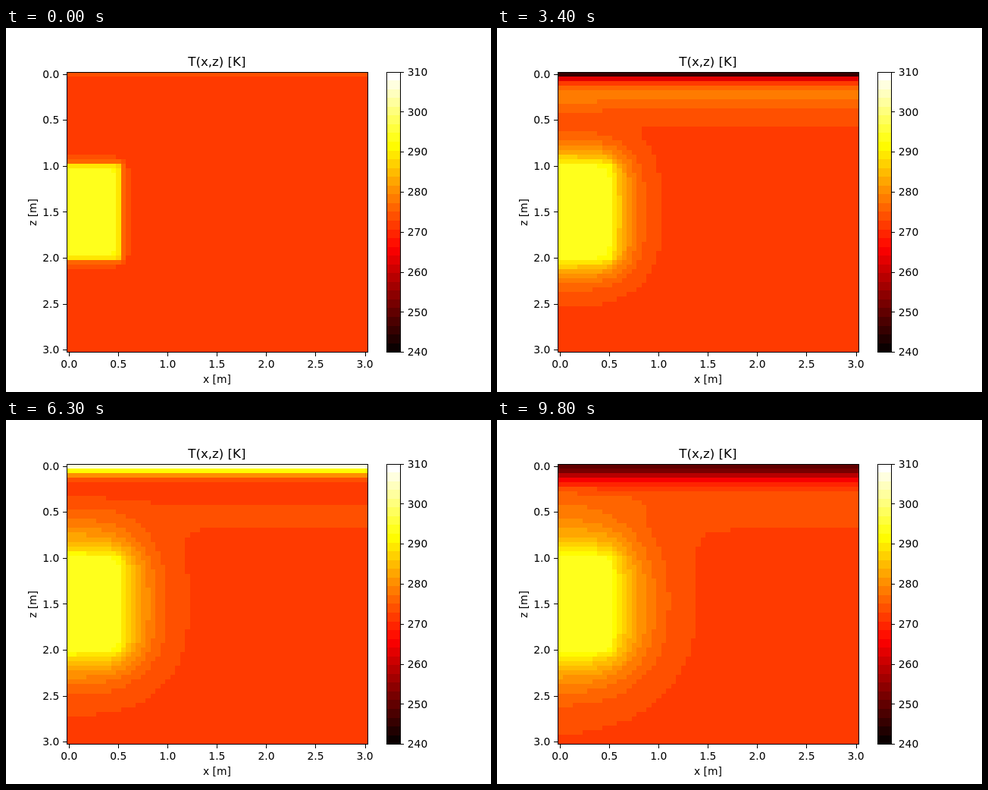
An HTML page with a canvas for the animation above (9.9 s loop, 640 px wide and 480 px high).

```html
<!DOCTYPE html>
<html lang="en">
<head>
<meta charset="utf-8">
<title>T(x,z) [K]</title>
<style>
  html, body { margin: 0; width: 100%; height: 100%; overflow: hidden; background: #fff; }
  canvas, svg { position: absolute; left: 0; top: 0; width: 640px; height: 480px; }
  text { font: 13.89px "DejaVu Sans", sans-serif; fill: #000; }
  .title { font-size: 16.67px; }
  .mid { text-anchor: middle; }
  .end { text-anchor: end; }
  path, rect { fill: none; stroke: #000; stroke-width: 1; }
</style>
</head>
<body>
<canvas id="map" width="640" height="480"></canvas>
<svg id="axes" viewBox="0 0 640 480"></svg>
<script>
const N = 61, FRAMES = 99, FRAME_MS = 100, LEVELS = 32;
const LEFT = 80, TOP = 57.6, WIDTH = 396.8, HEIGHT = 369.6;
const T_MIN = 240, T_MAX = 310;

// Ground, heated room and seasonal surface
const GROUND = 272.15, ROOM = 293.6, MEAN = 273.3, SWING = 40, PERIOD = 51.8;
const DIFFUSION = 0.36;

const clamp = (v, lo, hi) => Math.min(hi, Math.max(lo, v));

function hot(level) {
  const x = level / (LEVELS - 1);
  const channel = v => Math.round(255 * clamp(v, 0, 1));
  const r = channel(0.0416 + 0.9584 * x / 0.365079);
  const g = channel((x - 0.365079) / 0.380953);
  const b = channel((x - 0.746032) / 0.253968);
  return `rgb(${r},${g},${b})`;
}
const palette = Array.from({ length: LEVELS }, (_, i) => hot(i));

const toLevel = t =>
  clamp(Math.floor((t - T_MIN) / (T_MAX - T_MIN) * LEVELS), 0, LEVELS - 1);

// One implicit diffusion step with insulated sides
function diffuse(field) {
  const old = field.slice();
  for (let pass = 0; pass < 18; pass++) {
    for (let z = 0, k = 0; z < N; z++) {
      for (let x = 0; x < N; x++, k++) {
        let sum = 0, count = 0;
        if (x > 0) { sum += field[k - 1]; count++; }
        if (x < N - 1) { sum += field[k + 1]; count++; }
        if (z > 0) { sum += field[k - N]; count++; }
        if (z < N - 1) { sum += field[k + N]; count++; }
        field[k] = (old[k] + DIFFUSION * sum) / (1 + DIFFUSION * count);
      }
    }
  }
}

function simulate() {
  const field = new Float64Array(N * N).fill(GROUND);
  const frames = [];
  for (let n = 0; n < FRAMES; n++) {
    field.fill(MEAN + SWING * Math.sin(2 * Math.PI * n / PERIOD), 0, N);
    for (let z = 20; z <= 40; z++) field.fill(ROOM, z * N, z * N + 11);
    diffuse(field);
    frames.push(Uint8Array.from(field, toLevel));
  }
  return frames;
}

const ctx = document.getElementById("map").getContext("2d");
const colX = k => Math.round(LEFT + WIDTH * k / N);
const rowY = k => Math.round(TOP + HEIGHT * k / N);

function drawField(levels) {
  for (let z = 0; z < N; z++) {
    const y = rowY(z), h = rowY(z + 1) - y;
    for (let x = 0; x < N;) {
      const level = levels[z * N + x], start = x;
      while (x < N && levels[z * N + x] === level) x++;
      ctx.fillStyle = palette[level];
      ctx.fillRect(colX(start), y, colX(x) - colX(start), h);
    }
  }
}

function drawColorbar() {
  const edge = i => Math.round(TOP + HEIGHT * (1 - i / LEVELS));
  palette.forEach((color, i) => {
    ctx.fillStyle = color;
    ctx.fillRect(502, edge(i + 1), 18, edge(i) - edge(i + 1));
  });
}

function drawAxes() {
  const parts = [];
  const text = (x, y, s, cls = "", extra = "") =>
    parts.push(`<text x="${x}" y="${y}" class="${cls}" ${extra}>${s}</text>`);
  const line = d => parts.push(`<path d="${d}"/>`);
  const snap = v => Math.round(v) + 0.5;

  parts.push('<rect x="80.5" y="58.5" width="397" height="369"/>');
  parts.push('<rect x="502.5" y="58.5" width="18" height="369"/>');
  for (let v = 0; v <= 3; v += 0.5) {
    const part = (v + 0.025) / 3.05;
    const x = LEFT + WIDTH * part, y = TOP + HEIGHT * part;
    line(`M${snap(x)} 428v5`);
    line(`M75 ${snap(y)}h5`);
    text(x, 448, v.toFixed(1), "mid");
    text(70.3, Math.round(y + 5.1), v.toFixed(1), "end");
  }
  for (let t = T_MIN; t <= T_MAX; t += 10) {
    const y = TOP + HEIGHT * (T_MAX - t) / (T_MAX - T_MIN);
    line(`M521 ${snap(y)}h4`);
    text(529.8, Math.round(y + 5.1), t);
  }
  text(278.4, 50, "T(x,z) [K]", "title mid");
  text(278.4, 468, "x [m]", "mid");
  text(0, 0, "z [m]", "mid", 'transform="translate(40 243) rotate(-90)"');
  document.getElementById("axes").innerHTML = parts.join("");
}

const frames = simulate();
let shown = -1;

function tick() {
  const n = Math.floor(performance.now() / FRAME_MS) % FRAMES;
  if (n !== shown) drawField(frames[shown = n]);
  requestAnimationFrame(tick);
}

drawAxes();
drawColorbar();
tick();
</script>
</body>
</html>
```
